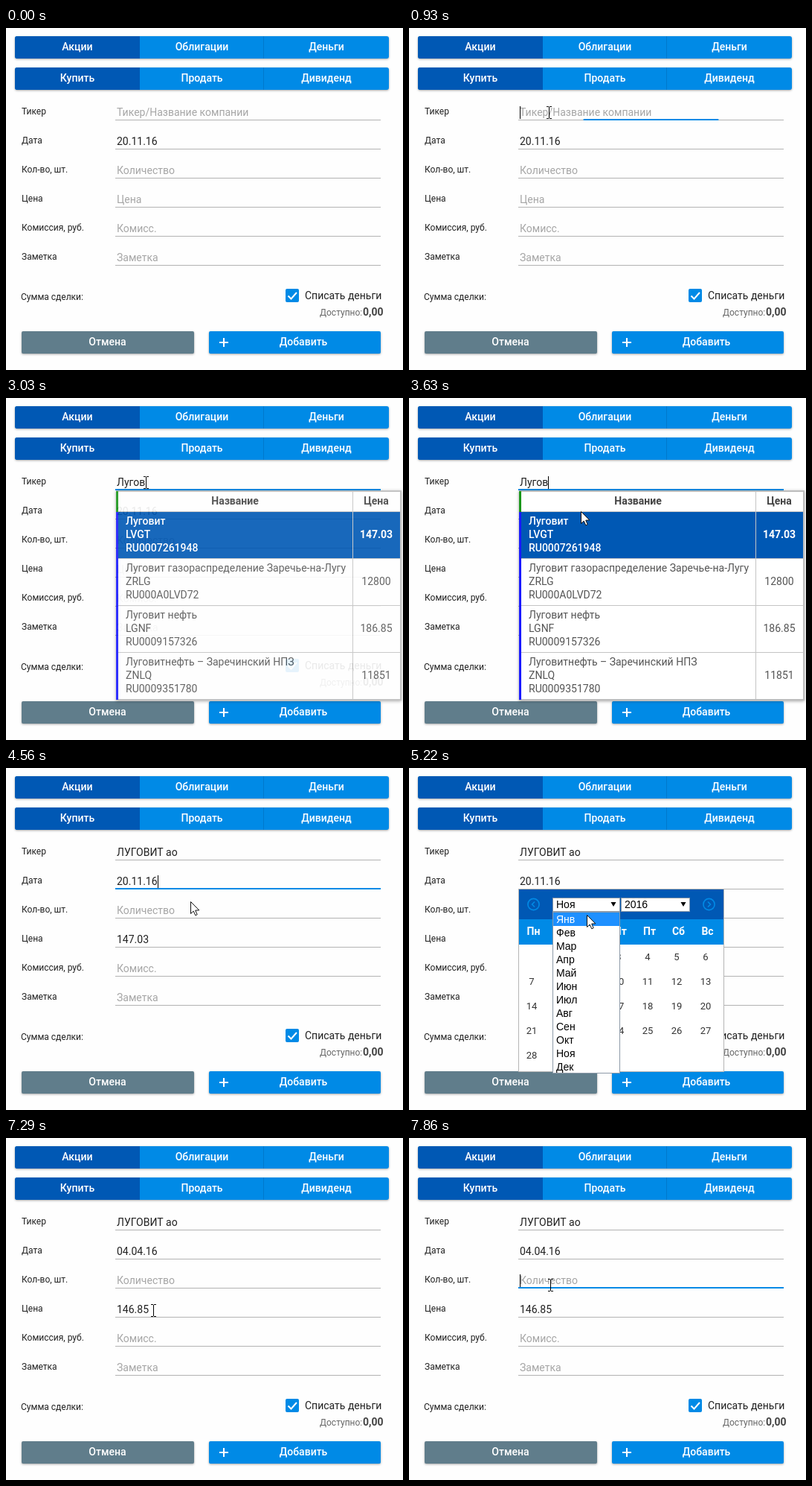
Animation of 534 by 459 pixels, one loop 8 s. Source, as an HTML page with a canvas:

```html
<!DOCTYPE html>
<html lang="ru">
<head>
<meta charset="utf-8">
<title>Новая сделка</title>
<style>
  html, body { margin: 0; width: 100%; height: 100%; overflow: hidden; background: #fefefe; }
  canvas { display: block; width: 534px; height: 459px; }
</style>
</head>
<body>
<canvas id="stage" width="534" height="459"></canvas>
<script>
const ctx = document.getElementById('stage').getContext('2d');
const LOOP = 8000;
const UI = 'Roboto, sans-serif';
const NATIVE = '"Liberation Sans", Arial, sans-serif';
const BLUE = '#008ae6', NAVY = '#0058b4', INK = '#212121', HINT = '#a6a6a6';

const FIELD = { left: 147, right: 504, first: 123, step: 39 };
const LABELS = ['Тикер', 'Дата', 'Кол-во, шт.', 'Цена', 'Комиссия, руб.', 'Заметка'];
const HINTS = ['Тикер/Название компании', '', 'Количество', 'Цена', 'Комисс.', 'Заметка'];

const QUERY = 'Лугов';
const KEY_TIMES = [1830, 1920, 2040, 2160, 2310];
const PICK_STOCK = 4170, OPEN_MONTHS = 5010, PICK_MONTH = 5970, PICK_DAY = 6900, NEW_PRICE = 7020;

const STOCKS = [
  ['Луговит', 'LVGT', 'RU0007261948', '147.03'],
  ['Луговит газораспределение Заречье-на-Лугу', 'ZRLG', 'RU000A0LVD72', '12800'],
  ['Луговит нефть', 'LGNF', 'RU0009157326', '186.85'],
  ['Луговитнефть – Заречинский НПЗ', 'ZNLQ', 'RU0009351780', '11851']
];
const MONTHS = 'Янв Фев Мар Апр Май Июн Июл Авг Сен Окт Ноя Дек'.split(' ');
const WEEK = 'Пн Вт Ср Чт Пт Сб Вс'.split(' ');

// Focus spans: row, start, end
const FOCUS = [[0, 840, PICK_STOCK], [1, PICK_STOCK, OPEN_MONTHS], [2, 7680, LOOP + 999]];

// Pointer moves: start, end, then a quadratic curve
const MOVES = [
  [60, 840, 508, 15, 230, 45, 188, 113],
  [3120, 3990, 188, 113, 228, 140, 248, 179],
  [5040, 5520, 248, 179, 232, 205, 229, 252],
  [5990, 6400, 229, 252, 160, 262, 131, 288],
  [6430, 6630, 131, 288, 146, 290, 162, 286],
  [6930, 7290, 162, 286, 190, 262, 198, 231],
  [7350, 7670, 198, 231, 197, 214, 190, 197]
];

const clamp = v => Math.max(0, Math.min(1, v));
const ease = v => 0.5 - Math.cos(Math.PI * clamp(v)) / 2;
const fade = (t, from, to, span = 300) => ease((t - from) / span) * (1 - ease((t - to) / span));
const lineY = row => FIELD.first + FIELD.step * row;

function rect(x, y, w, h, color) {
  ctx.fillStyle = color;
  ctx.fillRect(x, y, w, h);
}

function text(str, x, y, color = INK, size = 14, align = 'left', weight = 400, family = UI) {
  ctx.font = `${weight} ${size}px ${family}`;
  ctx.textAlign = align;
  ctx.fillStyle = color;
  ctx.fillText(str, x, y);
}

function poly(points, fill, stroke, width = 1, closed = true) {
  ctx.beginPath();
  points.forEach(([x, y]) => ctx.lineTo(x, y));
  if (closed) ctx.closePath();
  if (fill) { ctx.fillStyle = fill; ctx.fill(); }
  if (stroke) { ctx.strokeStyle = stroke; ctx.lineWidth = width; ctx.stroke(); }
}

function panel(x, y, w, h, color, radius, blur = 3, dy = 1) {
  ctx.save();
  ctx.shadowColor = 'rgba(0,0,0,.35)';
  ctx.shadowBlur = blur;
  ctx.shadowOffsetY = dy;
  ctx.fillStyle = color;
  ctx.beginPath();
  ctx.roundRect(x, y, w, h, radius);
  ctx.fill();
  ctx.restore();
}

function withAlpha(alpha, draw) {
  if (alpha <= 0) return;
  ctx.save();
  ctx.globalAlpha = alpha;
  draw();
  ctx.restore();
}

// Popups are painted on their own layer so that they fade as a whole
const layer = document.createElement('canvas');
layer.width = 534;
layer.height = 459;

function tabs(y, names) {
  panel(12, y, 503, 30, BLUE, 3);
  ctx.fillStyle = NAVY;
  ctx.beginPath();
  ctx.roundRect(12, y, 168, 30, [3, 0, 0, 3]);
  ctx.fill();
  rect(346, y, 1, 30, '#0078cc');
  names.forEach((name, i) => text(name, [96, 263.5, 431][i], y + 19, '#fff', 14, 'center', 500));
}

function fieldValue(row, t) {
  if (row === 0) {
    if (t >= PICK_STOCK) return 'ЛУГОВИТ ао';
    return QUERY.slice(0, KEY_TIMES.filter(k => t >= k).length);
  }
  if (row === 1) return t < PICK_DAY ? '20.11.16' : '04.04.16';
  if (row === 3 && t >= PICK_STOCK) return t < NEW_PRICE ? '147.03' : '146.85';
  return '';
}

function caretOn(row, t, from) {
  let since = row === 0 ? from + 180 : from;
  if (row === 0) KEY_TIMES.forEach(k => { if (t >= k) since = k; });
  return t < since || Math.floor((t - since) / 530) % 2 === 0;
}

function fields(t) {
  LABELS.forEach((label, row) => {
    const y = lineY(row), value = fieldValue(row, t);
    text(label, 21, y - 7, INK, 12);
    text(value || HINTS[row], 149, y - 5, value ? INK : HINT);
    rect(FIELD.left, y, FIELD.right - FIELD.left, 1, '#b3b3b3');
  });
  for (const [row, from, to] of FOCUS) {
    const y = lineY(row), grow = fade(t, from, to, 180);
    const w = (FIELD.right - FIELD.left) * grow;
    rect((FIELD.left + FIELD.right - w) / 2, y - 1, w, 2, BLUE);
    if (t > from && t < to && caretOn(row, t, from)) {
      ctx.font = `14px ${UI}`;
      const x = 149 + Math.round(ctx.measureText(row === 2 ? '' : fieldValue(row, t)).width);
      rect(x, y - 18, 1, 17, '#000');
    }
  }
}

function footer() {
  text('Сумма сделки:', 20, 365, INK, 12);
  ctx.fillStyle = BLUE;
  ctx.beginPath();
  ctx.roundRect(376, 350, 18, 18, 2);
  ctx.fill();
  poly([[379.5, 359.5], [383.5, 363.5], [391, 355]], null, '#fff', 2, false);
  text('Списать деньги', 402, 364);
  text('Доступно:', 422, 386, '#666', 12);
  text('0,00', 480, 386, '#444', 14, 'left', 700);
  panel(21, 407, 232, 30, '#607d8b', 2);
  panel(273, 407, 231, 30, BLUE, 2);
  text('Отмена', 136.5, 426, '#fff', 14, 'center', 500);
  text('Добавить', 400, 426, '#fff', 14, 'center', 500);
  rect(287, 421, 12, 2, '#fff');
  rect(292, 416, 2, 12, '#fff');
}

function stockList() {
  panel(148, 124, 384, 282, '#bdbdbd', 0, 4, 1);
  rect(151, 126, 379, 278, '#fff');
  rect(148, 125, 3, 28, '#1a961a');
  rect(148, 153, 3, 252, '#1a1aff');
  rect(151, 153, 379, 62, NAVY);
  for (let i = 0; i < 4; i++) rect(151, 152 + 63 * i, 379, 1, '#c4c4c4');
  rect(466, 126, 1, 278, '#c4c4c4');
  text('Название', 308, 143, '#444', 14, 'center', 700);
  text('Цена', 498, 143, '#444', 14, 'center', 700);
  STOCKS.forEach(([name, ticker, isin, price], i) => {
    const y = 170 + 63 * i, color = i ? '#555' : '#fff', weight = i ? 400 : 500;
    [name, ticker, isin].forEach((s, j) => text(s, 161, y + 18 * j, color, 14, 'left', weight));
    text(price, 498, y + 18, color, 14, 'center', i ? 400 : 700);
  });
}

function arrowButton(x, dir) {
  ctx.strokeStyle = BLUE;
  ctx.lineWidth = 1.6;
  ctx.beginPath();
  ctx.arc(x, 183, 7.6, 0, 7);
  ctx.stroke();
  poly([[x - 1.5 * dir, 179.5], [x + 2 * dir, 183], [x - 1.5 * dir, 186.5]], null, BLUE, 1.6, false);
}

function selectBox(x, w, label) {
  rect(x, 174, w, 19, '#8d9aa8');
  rect(x + 1, 175, w - 2, 17, '#fff');
  text(label, x + 5, 188, '#000', 14, 'left', 400, NATIVE);
  const ax = x + w - 9;
  poly([[ax - 3.5, 180], [ax + 3.5, 180], [ax, 186]], '#000');
}

function calendar(t) {
  const april = t >= PICK_MONTH, offset = april ? 4 : 1;
  rect(147, 163, 277, 245, '#b5b5b5');
  rect(148, 164, 275, 243, '#fff');
  rect(148, 163, 275, 40, NAVY);
  rect(148, 203, 275, 34, BLUE);
  arrowButton(167.5, -1);
  arrowButton(403.5, 1);
  selectBox(193, 91, MONTHS[april ? 3 : 10]);
  selectBox(285, 93, '2016');
  WEEK.forEach((day, i) => text(day, 167.5 + 39 * i, 224, '#fff', 14, 'center', 700));
  for (let d = 1; d <= 30; d++) {
    const cell = d - 1 + offset;
    text(d, 165 + 39 * (cell % 7), 258 + 33 * Math.floor(cell / 7), '#333', 13, 'center');
  }
}

function monthList(pointer) {
  const over = Math.floor((pointer.y - 194) / 18);
  const active = over >= 0 ? over : 10;
  rect(193, 193, 91, 217, '#8d9aa8');
  rect(194, 194, 89, 215, '#fff');
  MONTHS.forEach((name, i) => {
    const y = 194 + 18 * i;
    if (i === active) rect(194, y, 89, Math.min(18, 409 - y), '#1e90ff');
    text(name, 198, y + 14, i === active ? '#fff' : '#000', 14, 'left', 400, NATIVE);
  });
}

function popup(alpha, draw) {
  if (alpha <= 0) return;
  if (alpha >= 1) return draw();
  const back = layer.getContext('2d');
  back.globalCompositeOperation = 'copy';
  back.drawImage(ctx.canvas, 0, 0);
  draw();
  withAlpha(1 - alpha, () => ctx.drawImage(layer, 0, 0));
}

function pointerAt(t) {
  const move = MOVES.filter(m => t >= m[0]).pop();
  if (!move) return null;
  const [from, to, x0, y0, cx, cy, x1, y1] = move;
  const u = ease((t - from) / (to - from)), v = 1 - u;
  return {
    x: Math.round(v * v * x0 + 2 * u * v * cx + u * u * x1),
    y: Math.round(v * v * y0 + 2 * u * v * cy + u * u * y1)
  };
}

function overField({ x, y }, blocked) {
  if (x < FIELD.left || x > FIELD.right) return false;
  return LABELS.some((_, row) => {
    const line = lineY(row);
    return y > line - 21 && y <= line + 1 && !(blocked && row > 0);
  });
}

function drawPointer({ x, y }, beam) {
  ctx.save();
  ctx.translate(x, y);
  if (beam) {
    rect(0, -7, 1, 15, '#000');
    for (const end of [-8, 8]) {
      rect(-3, end, 3, 1, '#000');
      rect(1, end, 3, 1, '#000');
    }
  } else {
    ctx.translate(0.5, 0.5);
    poly([[0, 0], [0, 16], [3.7, 12.6], [6.3, 18.3], [8.7, 17.2], [6.2, 11.6], [11.3, 11.4]], '#fff', '#111');
  }
  ctx.restore();
}

function render(t) {
  const pointer = pointerAt(t);
  rect(0, 0, 534, 459, '#fefefe');
  tabs(11, ['Акции', 'Облигации', 'Деньги']);
  tabs(53, ['Купить', 'Продать', 'Дивиденд']);
  fields(t);
  footer();
  popup(fade(t, 2790, PICK_STOCK), stockList);
  popup(fade(t, 4590, PICK_DAY), () => calendar(t));
  if (t >= OPEN_MONTHS && t < PICK_MONTH) monthList(pointer);
  if (pointer) drawPointer(pointer, overField(pointer, t > 2790 && t < PICK_DAY));
}

function tick() {
  render(performance.now() % LOOP);
  requestAnimationFrame(tick);
}
tick();
</script>
</body>
</html>
```
